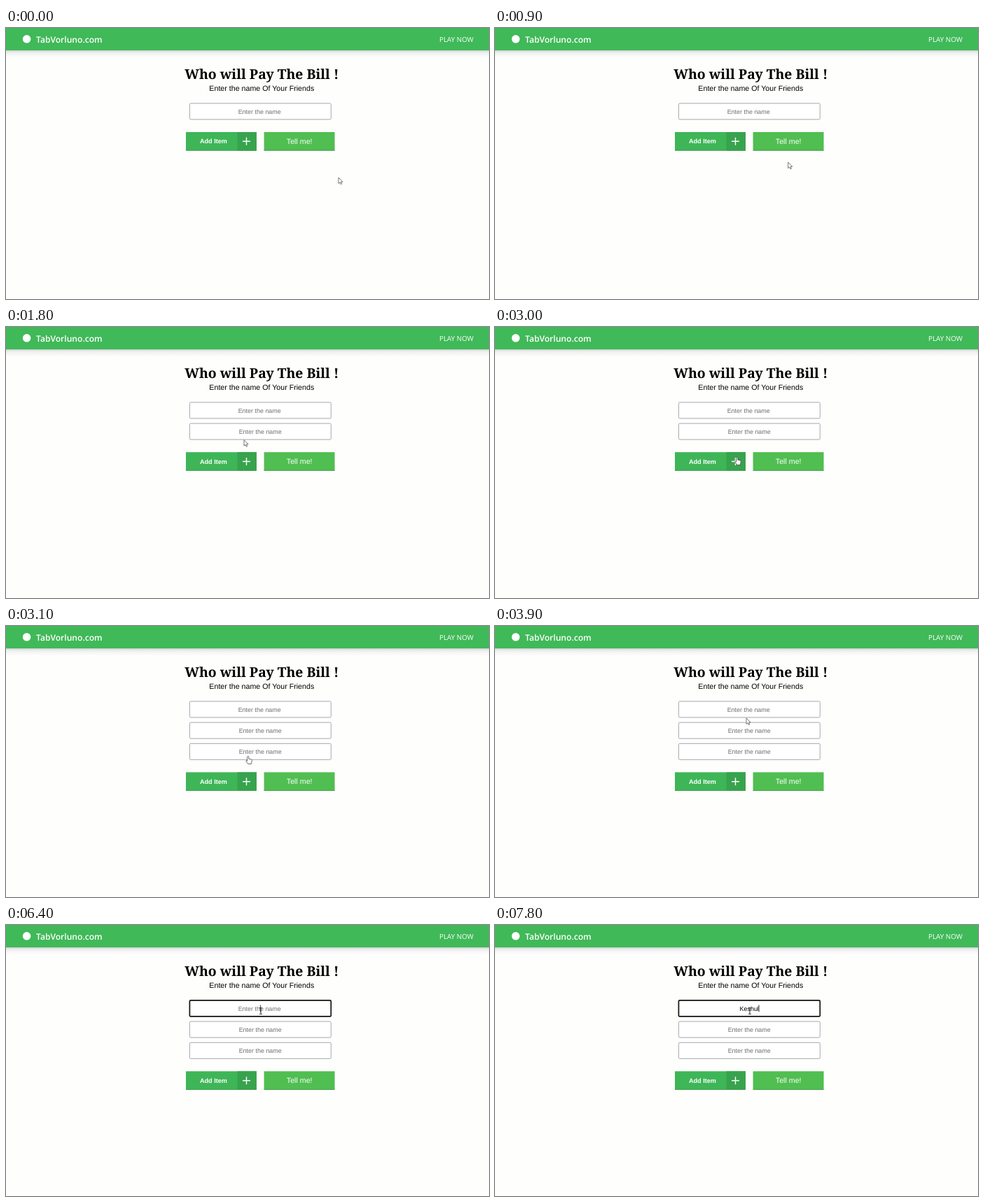
An HTML page that plays this animation: 690 by 388 pixels, repeating every 8000 ms.

```html
<!DOCTYPE html>
<html lang="en">
<head>
<meta charset="utf-8">
<title>Bill picker</title>
<style>
  html, body { margin: 0; width: 100%; height: 100%; overflow: hidden; background: #fefefc; }
  svg { display: block; width: 690px; height: 388px; }
  text { font: 8.95px "Liberation Sans", Arial, sans-serif; text-rendering: geometricPrecision; }
  .mid { text-anchor: middle; }
  .brand { font: 600 12.1px "Open Sans", sans-serif; fill: #fff; }
  .nav { font: 500 9.9px "Open Sans", sans-serif; fill: #fff; }
  .title { font: bold 19.4px "Noto Serif", serif; }
  .body { font-size: 10.67px; }
  .add { font-weight: bold; font-size: 9.1px; }
  .hint { fill: #6d6d6d; }
  .field { fill: #fff; stroke: #a3a9ad; stroke-width: 1; }
  .field.focus { stroke: #111; stroke-width: 1.7; }
</style>
</head>
<body>
<svg viewBox="0 0 690 388">
  <defs>
    <linearGradient id="shade" x2="0" y2="1">
      <stop stop-color="#8a9490" stop-opacity=".42"/>
      <stop offset=".3" stop-color="#a0a4b0" stop-opacity=".17"/>
      <stop offset="1" stop-color="#c0c0d0" stop-opacity="0"/>
    </linearGradient>
  </defs>
  <rect width="690" height="388" fill="#fefefc"/>
  <rect y="32" width="690" height="11" fill="url(#shade)"/>
  <rect width="690" height="32" fill="#40b958"/>
  <circle cx="29.6" cy="15.8" r="5.8" fill="#fff"/>
  <text class="brand" x="43" y="20.6">TabVorluno.com</text>
  <text class="nav" x="619" y="20">PLAY NOW</text>
  <text class="title mid" x="365.3" y="72.6">Who will Pay The Bill !</text>
  <text class="body mid" x="365.3" y="90">Enter the name Of Your Friends</text>

  <g id="fields"></g>
  <text id="typed" class="mid" x="363.2" y="122.5"></text>
  <path id="caret" d="M0 114.5V124.5" stroke="#111" stroke-width=".8"/>

  <g id="buttons">
    <rect x="257" y="149" width="101" height="26.6" fill="#3eb657"/>
    <rect x="330.5" y="149" width="27.5" height="26.6" fill="#37a34d"/>
    <rect x="368.6" y="149" width="101" height="26.6" fill="#50be51"/>
    <path d="M257 175.2H358M368.6 175.2H469.6" stroke="#369c48" stroke-width=".8"/>
    <path d="M338 162.3H349M343.5 156.8V167.8" stroke="#fff" stroke-width="1.4"/>
    <g fill="#fff">
      <text class="add" x="277" y="165.4">Add Item</text>
      <text class="body mid" x="419.2" y="165.9">Tell me!</text>
    </g>
  </g>

  <g id="cursor" stroke-linejoin="round">
    <path id="arrow" d="M0 0V8.6L2 6.9 3.3 9.8 4.7 9.2 3.4 6.3H6.1Z" fill="#fff" stroke="#555" stroke-width=".8"/>
    <path id="hand" d="M2 1Q3.1-.6 4.1 1V4.2L8 5.2Q8.7 5.5 8.6 6.6L7.7 11.5H3L.3 7.6Q-.1 6.5 1 6.4L2 7.2Z" fill="#fff" stroke="#333" stroke-width=".7"/>
    <path id="beam" d="M-1.9-4.5H-.6L0-4 .6-4.5H1.9M0-4V4M-1.9 4.5H-.6L0 4 .6 4.5H1.9" fill="none" stroke="#222" stroke-width="1"/>
  </g>
</svg>
<script>
const LOOP = 8000, TICK = 100, PITCH = 30.2;
const NAME = "Keshul";
const $ = id => document.getElementById(id);

// Cursor stops: time, x, y
const path = [
  [500, 475, 214], [1400, 340, 161.6],
  [2200, 340, 161.6], [2800, 342.7, 186],
  [3500, 342.7, 186], [3900, 359, 131.8], [4300, 364, 123.2]
];
const keyTimes = [6600, 6900, 7300, 7300, 7600, 7700];

$("fields").innerHTML = [0, 1, 2].map(i => `<g transform="translate(0 ${i * PITCH})">
  <rect class="field" x="262.4" y="107.9" width="201.9" height="23" rx="1.5"/>
  <text class="hint mid" x="${i ? 363.2 : 362.2}" y="122.5">Enter the name</text></g>`).join("");
const fields = [...$("fields").children];
const [firstBox, firstHint] = fields[0].children;

const show = (el, on) => el.setAttribute("visibility", on ? "visible" : "hidden");
const within = (v, a, b) => v >= a && v < b;

function cursorAt(t) {
  const i = path.findIndex(p => p[0] > t);
  if (i === 0) return path[0].slice(1);
  if (i < 0) return path[path.length - 1].slice(1);
  const [t0, x0, y0] = path[i - 1], [t1, x1, y1] = path[i];
  const u = (t - t0) / (t1 - t0), k = u * u * (3 - 2 * u);
  return [x0 + (x1 - x0) * k, y0 + (y1 - y0) * k];
}

function shapeAt(x, y, rows) {
  const top = 149 + (rows - 1) * PITCH;
  if (within(y, top, top + 26.6) && (within(x, 257, 358) || within(x, 368.6, 469.6))) return "hand";
  for (let i = 0; i < rows; i++)
    if (within(x, 262, 465) && within(y - i * PITCH, 107.5, 131.3)) return "beam";
  return "arrow";
}

function draw(t) {
  const rows = 1 + (t >= 1800) + (t >= 3100);
  fields.forEach((f, i) => show(f, i < rows));
  $("buttons").setAttribute("transform", `translate(0 ${(rows - 1) * PITCH})`);

  const text = NAME.slice(0, keyTimes.filter(k => t >= k).length);
  $("typed").textContent = text;
  show(firstHint, !text);
  firstBox.classList.toggle("focus", t >= 4600);

  const caretX = 363.4 + (text ? $("typed").getComputedTextLength() / 2 : 0);
  $("caret").setAttribute("transform", `translate(${caretX} 0)`);
  show($("caret"), within(t, 4600, 5100) || within(t, 5800, 6000) || t >= 6400);

  // The pointer keeps its shape after the second click until it moves
  const [x, y] = cursorAt(t);
  const shape = shapeAt(x, y, within(t, 3100, 3600) ? 2 : rows);
  $("cursor").setAttribute("transform", `translate(${x} ${y})`);
  for (const id of ["arrow", "hand", "beam"]) show($(id), id === shape);
}

const start = performance.now();
function frame() {
  const t = (performance.now() - start) % LOOP;
  draw(Math.floor(t / TICK) * TICK);
  requestAnimationFrame(frame);
}
frame();
</script>
</body>
</html>
```
